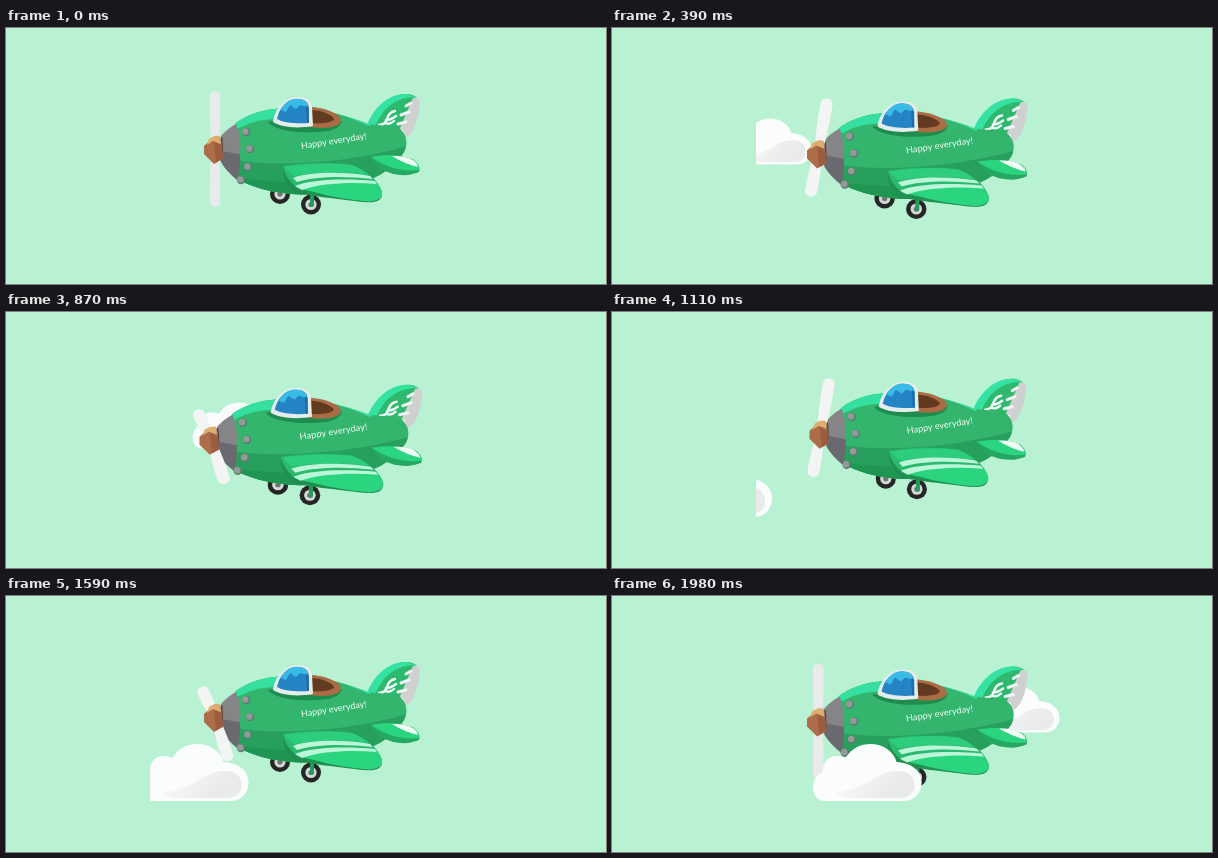
Write an HTML page with a canvas that moves like this. It is 600 px wide and 256 px high and loops after 2.01 s.

```html
<!DOCTYPE html>
<html lang="en">
<head>
<meta charset="utf-8">
<title>Little plane</title>
<style>
  html, body { margin: 0; width: 100%; height: 100%; overflow: hidden; background: #b8f2d3; }
  canvas { display: block; }
</style>
</head>
<body>
<canvas id="stage" width="600" height="256"></canvas>
<script>
const ctx = document.getElementById('stage').getContext('2d');
const LOOP = 2010, STEP = 30, BOB = 530, EDGE = 144;

function shape(d, fill) {
  ctx.fillStyle = fill;
  ctx.fill(new Path2D(d));
}

function line(d, color, width) {
  ctx.strokeStyle = color;
  ctx.lineWidth = width;
  ctx.lineCap = ctx.lineJoin = 'round';
  ctx.stroke(new Path2D(d));
}

function disc(x, y, r, fill) {
  ctx.fillStyle = fill;
  ctx.beginPath();
  ctx.arc(x, y, r, 0, Math.PI * 2);
  ctx.fill();
}

// A cloud 109 x 57 units, placed by its right end and top
function cloud(right, top, scale) {
  ctx.save();
  ctx.beginPath();
  ctx.rect(EDGE, 0, 600, 256);
  ctx.clip();
  ctx.translate(right - 109 * scale, top);
  ctx.scale(scale, scale);
  shape('M12 57 C-2 57 -4 34 10 28 C10 13 22 9 33 14 C39 4 48 0 58 0 C70 0 81 7 84 18 C99 19 109 27 109 38 C109 50 101 57 91 57Z', '#fbfdfc');
  const shade = ctx.createLinearGradient(40, 30, 70, 56);
  shade.addColorStop(0, '#f6f8f7');
  shade.addColorStop(1, '#e8ebea');
  shape('M20 50 C35 46 50 43 62 34 C75 26 92 24 99 32 C106 43 101 52 90 54 L34 54Z', shade);
  ctx.restore();
}

function wheel(x, y) {
  disc(x, y, 10, '#262626');
  disc(x, y, 5.6, '#d4d8d6');
  disc(x, y, 2.6, '#6d7472');
}

function bolt(x, y) {
  disc(x, y, 4.2, '#5f7a70');
  disc(x - 0.6, y - 0.5, 3.2, '#939b99');
}

// Blade tips seen at an angle, for each twelfth of a turn: upper x, y, lower x, y
const TIPS = [
  [0, -58, 0, 58], [9, -55, -8, 43], [22, -30, -18, 19],
  [25, 3, -20, -4], [21, 27, -19, -18], [-14, -30, 14, 44]
];

function blade(x, y, fill) {
  const len = Math.hypot(x, y), w = len > 56 ? 5.3 : 6;
  ctx.save();
  ctx.translate(209, 121);
  ctx.rotate(Math.atan2(y, x));
  ctx.fillStyle = fill;
  ctx.beginPath();
  ctx.moveTo(0, -3.5);
  ctx.bezierCurveTo(len * 0.4, -w, len * 0.6, -w, len - 6, -w);
  ctx.bezierCurveTo(len + 2, -w, len + 2, w, len - 6, w);
  ctx.bezierCurveTo(len * 0.6, w, len * 0.4, w, 0, 3.5);
  ctx.fill();
  ctx.restore();
}

function propeller(t) {
  const pose = Math.round(t / STEP) % 6;
  const [ax, ay, bx, by] = TIPS[pose];
  const fill = pose ? '#f3f5f4' : '#e9ebea';
  blade(ax, ay, fill);
  blade(bx, by, fill);
  shape('M209 108 L215 110 L217 131 L208 136 L198 126 L198 118Z', '#ad6d4a');
  shape('M203 111 Q208 107 214 108 L215 116 L207 113 L201 117Z', '#dcae6f');
  shape('M208 114 L216 118 L217 130 L210 134Z', '#9a5d3f');
}

function tail() {
  shape('M361 98 C368 84 378 67 400 66 C405 66 409 68 411 70 L396 112 L376 114Z', '#2fb96e');
  shape('M361 97 C367 82 380 66 400 66 L410 69 C389 69 376 81 369 99Z', '#35e2a2');
  shape('M407 70 Q412 68 414 73 C413 91 408 105 401 109 Q395 114 387 113 L394 100Z', '#cfd1d1');
  line('M405 75 L400 78 M403 84 L395 87 M400 94 L392 96 M396 103 L390 106', '#eef4f1', 3);
  line('M373 97 Q379 97 381 91 Q383 84 389 83 M380 92 Q385 92 390 88 M379 95 Q384 97 388 93', '#f3fff9', 2.4);
}

function body() {
  const hull = new Path2D('M229 96 C240 86 262 79 290 80 C320 81 345 89 362 96 L392 99 C402 107 402 116 398 124 C390 136 378 147 362 152 C340 162 310 168 285 166 C262 164 244 158 231 151 Q235 120 229 96Z');
  ctx.save();
  ctx.clip(hull);
  ctx.fillStyle = '#33b56d';
  ctx.fillRect(220, 70, 190, 100);
  shape('M228 132 C270 139 340 136 405 117 L405 175 L225 175Z', '#27a05d');
  shape('M228 150 C260 153 280 154 300 155 L300 170 L228 170Z', '#209653');
  shape('M226 98 C240 80 265 77 284 78 L268 91 C250 92 240 96 230 102Z', '#35dfa0');
  line('M325 82 Q347 88 363 96', '#35dfa0', 4);
  ctx.restore();
}

function nose() {
  shape('M215 108 Q222 100 230 96 Q236 110 234 126 L215 124Z', '#858587');
  shape('M215 123 L234 126 Q235 142 231 152 Q220 143 215 134Z', '#69696f');
  line('M215.5 110 Q217 122 215.5 132', '#46474b', 1.6);
  bolt(240, 104);
  bolt(244, 121);
  bolt(242, 139);
  bolt(235, 152);
}

function cockpit() {
  shape('M262 94 C270 104 300 106 322 103 Q335 100 336 93 L305 84Z', '#1f8c4f');
  shape('M303 79 C318 79 336 86 335 93 C333 100 318 101 304 99Z', '#a96c44');
  shape('M305 82 C315 82 327 87 328 91 C326 95 315 96 305 95Z', '#613a20');
  shape('M267 94 C269 80 279 69 292 69 C301 69 306 73 306 79 L307 98 C290 101 275 99 267 94Z', '#e6ecec');
  shape('M271 91 C273 80 281 71 291 71 C299 71 302 74 303 80 L303 95 C290 96 278 95 271 91Z', '#2584c3');
  shape('M275 82 C279 74 285 70 293 71 C299 71 302 75 302 79 L294 77 L290 81 L284 77 L280 84Z', '#38bbe6');
  line('M301 79 L302 94', '#1d68a5', 2);
}

function wings() {
  shape('M277 138 C300 134 328 134 346 137 C360 142 372 152 376 164 C377 174 368 175 357 174 C330 171 300 167 288 165 C281 157 276 148 277 138Z', '#208f50');
  shape('M277 138 C300 134 328 134 346 137 C357 141 367 149 372 156 C345 156 310 153 291 160 C283 153 278 146 277 138Z', '#2bb96f');
  shape('M291 160 C310 152 350 154 371 155 Q377 163 376 168 Q371 175 357 173 C333 171 312 165 291 160Z', '#2bd580');
  shape('M278 139 C300 135 330 135 346 137 Q356 141 363 147 C335 143 305 144 288 148Z', '#2dcd7e');
  shape('M287 150 C305 143 340 144 364 148 L367 151 C340 148 310 148 291 154Z', '#bcf6d8');
  shape('M289 158 C310 150 345 151 369 153 L371 156 C345 154 315 155 296 162Z', '#bcf6d8');
  shape('M365 129 C380 126 400 127 409 133 Q415 139 413 144 Q402 149 387 146 Q371 142 365 129Z', '#25a862');
  shape('M365 129 C380 126 400 127 409 133 Q414 137 413 142 C397 144 378 139 365 129Z', '#2bd580');
  shape('M386 128 Q405 127 411 136 L412 139 Q399 136 386 128Z', '#f1fbf6');
}

function caption() {
  ctx.save();
  ctx.translate(295.5, 121);
  ctx.rotate(-0.155);
  ctx.fillStyle = '#f4fff9';
  ctx.font = '9px Lato, "Open Sans", sans-serif';
  ctx.fillText('Happy everyday!', 0, 0);
  ctx.restore();
}

function plane(t) {
  const dip = (1 - Math.cos(t / BOB * Math.PI * 2)) / 2;
  const stretch = 1 + 0.039 * dip;
  ctx.save();
  ctx.translate(339 * (1 - stretch), 8.3 * dip);
  ctx.scale(stretch, 1);
  wheel(274, 166);
  tail();
  body();
  wheel(305, 176.5);
  line('M306 166 L306 177', '#239c59', 4);
  cockpit();
  wings();
  nose();
  propeller(t);
  caption();
  ctx.restore();
}

function draw(now) {
  const t = Math.floor((now % LOOP) / STEP) * STEP;
  ctx.fillStyle = '#b8f2d3';
  ctx.fillRect(0, 0, 600, 256);
  cloud(176 + 0.156 * (t - 240), 90.5, 0.807);
  plane(t);
  cloud(160 + 0.172 * (t - 1110), 148, 1);
}

let start;
function tick(now) {
  start ??= now;
  draw(now - start);
  requestAnimationFrame(tick);
}
draw(0);
requestAnimationFrame(tick);
</script>
</body>
</html>
```
